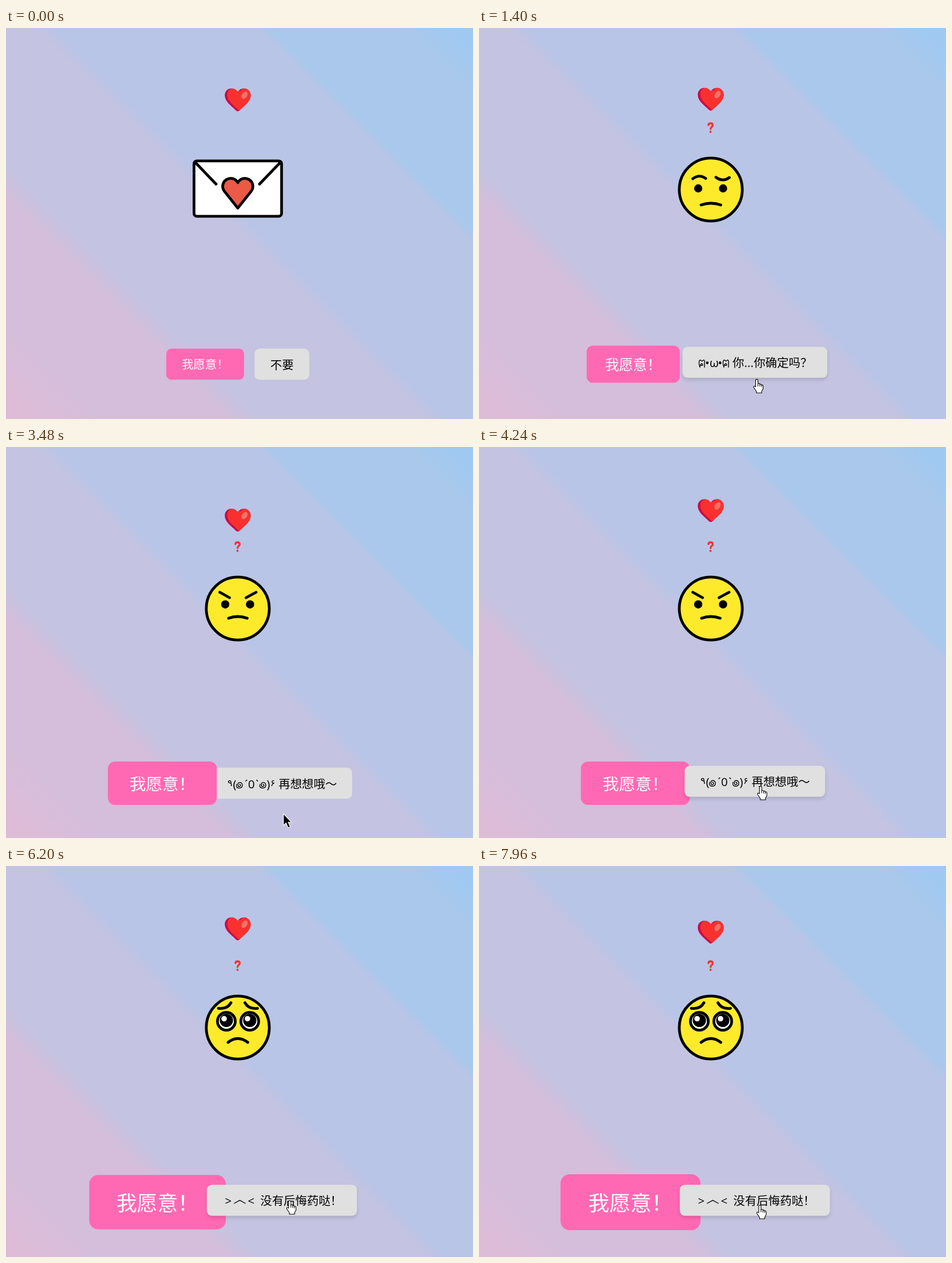
Write an HTML page that moves like this. It is 818 px wide and 685 px high and loops after 8000 ms.

```html
<!DOCTYPE html>
<html lang="zh-CN">
<head>
<meta charset="utf-8">
<title>Love letter</title>
<style>
html, body { margin: 0; width: 100%; height: 100%; overflow: hidden; }
body {
  background: linear-gradient(45deg,
    #ddbcd8 3%, #d4bedb 12%, #d4bedb 26%, #c4c3e1 29.5%, #c4c3e1 49%,
    #b8c5e7 51.5%, #b8c5e7 74.8%, #a9c8ec 76.3%, #a9c8ec 92.5%, #a0c9f1 97%);
}
svg { display: block; width: 818px; height: 685px; }
text { font: 20.45px "Open Sans", "Noto Sans CJK SC", "Noto Sans CJK", "DejaVu Sans", sans-serif; white-space: pre; }
.cjk { font-family: "Noto Sans CJK SC", "Noto Sans CJK", sans-serif; }
.small { font: 16px "DejaVu Sans", sans-serif; }
.line { fill: none; stroke: #000; stroke-width: 4.8; stroke-linecap: round; stroke-linejoin: round; }
.glyph { fill: none; stroke: #000; stroke-width: 1.4; stroke-linecap: round; stroke-linejoin: round; }
</style>
</head>
<body>
<svg viewBox="0 0 818 685">
  <defs>
    <path id="heartShape" d="M22.7 6C20 2 16 0 11.7 0C5 0 0 5 0 12.3C0 23.5 12 31 19.2 38.4Q22.7 42 26.2 38.4C33.4 31 45.4 23.5 45.4 12.3C45.4 5 40 0 33.7 0C29.4 0 25.4 2 22.7 6Z"/>
    <clipPath id="heartClip"><use href="#heartShape"/></clipPath>
    <circle id="disc" class="line" cx="406" cy="283" r="55.2" style="fill:#fcea2b"/>
    <path id="steam" class="line" style="fill:#d0cfce" d="M393 287L360 301C356 294 341 295 341.5 307C341.7 310 343 312 344 312.5C336 316 336 333 349 334C352 334 354 332 355 331C360 337 371 334 372 326C373 321 371 318 368 316Z"/>
    <g id="eye">
      <circle class="line" r="15.6" style="fill:#fff"/>
      <circle cy="-1.5" r="11.6"/>
      <circle cx="-4" cy="-4.5" r="4.8" fill="#fff"/>
    </g>
    <path id="paw" class="glyph" d="M2 0C-.5-6 0-13 3-12.5L5.5-10.5L8-12.5C11-13 10-9 10 0M2 0C2-4 5-7.5 6-5.8A1.5 1.5 0 1 1 4-4"/>
    <path id="curl" class="glyph" d="M1-7C-.5-2 2 0 5.5 0C9 0 11-2 11-5C11-8 9-10 6-10C3.5-10 3-7 3.5-5.5A2.2 2.2 0 1 0 6-7"/>
    <path id="roof" class="glyph" d="M.8-3.2L10.5-8.6L20.2-3.2"/>
  </defs>

  <g id="heart">
    <use href="#heartShape" fill="#ca0b4a"/>
    <g clip-path="url(#heartClip)"><use href="#heartShape" x="4.4" y="-.8" fill="#f8312f"/></g>
    <ellipse cx="34.6" cy="12" rx="4.6" ry="7.2" transform="rotate(32 34.6 12)" fill="#f37366"/>
  </g>

  <g id="mark">
    <path d="M401.9 170.2C401.9 168 403.6 167 405.6 167C408 167 409.4 168.5 409.4 170.4C409.4 173.4 405.6 173.4 405.6 177" fill="none" stroke="#f8312f" stroke-width="3.3" stroke-linecap="round"/>
    <circle cx="405.5" cy="181.9" r="1.9" fill="#f8312f"/>
  </g>

  <g class="face">
    <rect class="line" x="329.3" y="232.8" width="153.4" height="97" rx="5" style="fill:#fff"/>
    <path class="line" d="M332 236L368 273.5M480 236L444 273.5"/>
    <path class="line" style="fill:#ea5a47" d="M406 315.5L382.5 286A14 14 0 1 1 406 271A14 14 0 1 1 429.5 286Z"/>
  </g>
  <g class="face">
    <use href="#disc"/>
    <path class="line" d="M374.5 264Q386 255.5 397 263.5M415 261.5Q427 270.5 438.5 262M389 310Q406 304 423.5 310"/>
    <circle cx="384" cy="281" r="7.2"/><circle cx="427.5" cy="281" r="7.2"/>
  </g>
  <g class="face">
    <use href="#disc"/>
    <path class="line" d="M374.5 254.5L391.5 264M438 254.5L420.5 264M389.8 300Q406 294 422.5 300"/>
    <circle cx="384" cy="275.7" r="7.2"/><circle cx="427.5" cy="275.7" r="7.2"/>
  </g>
  <g class="face">
    <circle cx="406" cy="283" r="55.2" fill="#fcea2b"/>
    <path class="line" d="M351 289A55.2 55.2 0 1 1 461 288M379.5 331.5A55.2 55.2 0 0 0 433 331.5"/>
    <path class="line" d="M374.5 254.5L391.5 264M438 254.5L420.5 264M373.5 275.5Q384 283.5 396 276M416 276Q428 283.5 438.5 275.5M390.5 300Q406 295 422 300"/>
    <use href="#steam"/><use href="#steam" transform="matrix(-1 0 0 1 812 0)"/>
  </g>
  <g class="face">
    <use href="#disc"/>
    <path class="line" d="M372 249.3C382 250.5 390 247 394 239.5M440.5 249.3C430.5 250.5 422.5 247 418.5 239.5M389 309Q406 295.5 423.5 309"/>
    <use href="#eye" x="386" y="272"/><use href="#eye" x="427" y="272"/>
  </g>

  <g id="buttons">
    <g id="no"><rect y="561.8" height="54.4" rx="9" fill="#e0e0e0"/></g>
    <g id="yes">
      <rect x="-68.15" y="-27.2" width="136.3" height="54.4" rx="9" fill="#ff69b4"/>
      <text class="cjk" x="-41" y="8.4" fill="#fff">我愿意！</text>
    </g>
  </g>

  <path id="arrow" d="M0 0V20.5L4.6 16.3L8 24.4L11.8 22.8L8.3 14.8H14Z" stroke="#fff" stroke-width="1.1"/>
  <g id="hand" stroke="#000" stroke-width="1.1" stroke-linejoin="round">
    <path fill="#fff" d="M-2 2.2A2 2 0 0 1 2 2.2V8.5C2 7 5.4 7 5.4 9V9.6C5.6 8.4 8.4 8.6 8.4 10.4C9 9.6 11 10 11 12V17L8.6 21V24H-.6V21.5L-5 15C-6.4 12.6-4 11-2 13.5Z"/>
    <path fill="none" d="M2 8.5V12.5M5.4 9.5V13M8.4 10.4V13.5"/>
  </g>
</svg>
<script>
const LOOP = 8000, RATE = 25 / 24, FADE = 300;
const BASE = 597.6, MID = 406;
const $ = id => document.getElementById(id);

// Each label: button width and its pieces [x, text or #glyph, rise, class]
const labels = [
  [96, [[463, '不要']]],
  [253.5, [[385, '#paw'], [396, '•'], [404, 'ω'], [418.5, '•'], [427, '#paw'],
    [444, '你'], [464.5, '...'], [481.2, '你确定吗？']]],
  [246, [[388, '٩', 4, 'small'], [397.5, '('], [403, '#curl'], [415, '´'], [424, '0'], [434, '`'],
    [444, '#curl'], [456.5, ')'], [463, '۶', 4, 'small'], [477.5, '再想想哦～']]],
  [246, [[387, '('], [393.5, '｡'], [403.3, '•'], [404.5, '´', 3], [411.5, '#roof'], [433.3, '•'],
    [430, '`', 3], [440.5, '｡'], [449.5, ')'], [461, '你会后悔的'], [563, '...']]],
  [263, [[383.5, '>'], [399, '#roof'], [423.5, '<'], [445.5, '没有后悔药哒！']]]
];

const clicks = [1160, 2840, 4500, 6065];
const hovers = [[900, 1440], [2230, 3120], [4000, 4760], [5580, 6480], [7630, 9000]];

// Pointer stops: time, x, y
const path = [
  [260, 367, 690], [560, 408, 652], [760, 448, 629], [840, 461, 620], [1000, 484, 598],
  [1240, 486, 598], [1540, 487, 629], [2060, 489, 630], [2240, 493, 609], [2440, 495, 594],
  [2920, 494, 594], [3300, 486, 642], [3660, 486, 643], [4100, 493, 594], [4560, 494, 594],
  [4860, 488, 634], [5300, 488, 634], [5720, 496, 590], [6240, 497, 586], [6640, 492, 646],
  [7200, 490, 647], [7640, 492, 612], [7900, 492, 594]
];

function bezier(x1, y1, x2, y2) {
  const at = (a, b, u) => 3 * a * u * (1 - u) ** 2 + 3 * b * u * u * (1 - u) + u ** 3;
  return x => {
    if (x <= 0 || x >= 1) return x <= 0 ? 0 : 1;
    let lo = 0, hi = 1;
    for (let i = 0; i < 24; i++) {
      const m = (lo + hi) / 2;
      if (at(x1, x2, m) < x) lo = m; else hi = m;
    }
    return at(y1, y2, lo);
  };
}
const ease = bezier(.25, .1, .25, 1);
const easeInOut = bezier(.42, 0, .58, 1);
const since = (t, start) => ease((t - start) * RATE / FADE);

function pointer(t) {
  let i = path.findIndex(p => p[0] > t);
  if (i === 0) return path[0].slice(1);
  if (i < 0) return path[path.length - 1].slice(1);
  const [a, b] = [path[i - 1], path[i]];
  const k = (t - a[0]) / (b[0] - a[0]);
  const s = k * k * (3 - 2 * k);
  return [1, 2].map(n => a[n] + (b[n] - a[n]) * s);
}

function piece([x, s, rise = 0, cls = '']) {
  const y = BASE - rise;
  if (s[0] === '#') return `<use href="${s}" x="${x}" y="${y}"/>`;
  if (!cls && s.charCodeAt(0) > 0x3000) cls = 'cjk';
  return `<text class="${cls}" x="${x}" y="${y}">${s.replace('<', '&lt;')}</text>`;
}

const heart = $('heart'), mark = $('mark'), yes = $('yes'), no = $('no');
const arrow = $('arrow'), hand = $('hand'), buttons = $('buttons');
const box = no.querySelector('rect');
const faces = [...document.querySelectorAll('.face')];
no.insertAdjacentHTML('beforeend', labels.map(l => `<g class="label">${l[1].map(piece).join('')}</g>`).join(''));
const captions = [...no.querySelectorAll('.label')];

const show = (el, on) => { el.style.display = on ? '' : 'none'; };
const move = (el, x, y, k = 1) => el.setAttribute('transform', `translate(${x} ${y}) scale(${k})`);

function draw(t) {
  const step = clicks.filter(c => t >= c).length;
  const phase = ((t + 240) * RATE / 1000) % 2;
  const rise = easeInOut(phase < 1 ? phase : 2 - phase);
  move(heart, 383.2, 108.7 - 22.7 * rise);

  show(mark, step > 0);
  faces.forEach((f, i) => show(f, i === step));
  captions.forEach((c, i) => show(c, i === step));

  const width = labels[step][0], half = (154.5 + width) / 2;
  box.setAttribute('x', MID + half - width);
  box.setAttribute('width', width);
  const grow = clicks.reduce((k, c) => k + .2 * since(t, c), 1);
  move(yes, MID - half + 68.15, 589, grow);

  const lift = hovers.reduce((k, [a, b]) => k + since(t, a) - since(t, b), 0);
  move(no, 0, -3.4 * lift);
  box.style.filter = lift > .01 ? `drop-shadow(0 4px 3px rgba(0,0,0,${.12 * lift}))` : '';
  // A lifted button rises above its neighbour
  const top = lift > .01 ? no : yes;
  if (buttons.lastElementChild !== top) buttons.append(top);

  const over = hovers.some(([a, b]) => t >= a && t < b);
  const [x, y] = pointer(t);
  show(arrow, !over);
  show(hand, over);
  move(over ? hand : arrow, x, y);
}

const start = performance.now();
function tick() {
  draw((performance.now() - start) % LOOP);
  requestAnimationFrame(tick);
}
draw(0);
requestAnimationFrame(tick);
</script>
</body>
</html>
```
